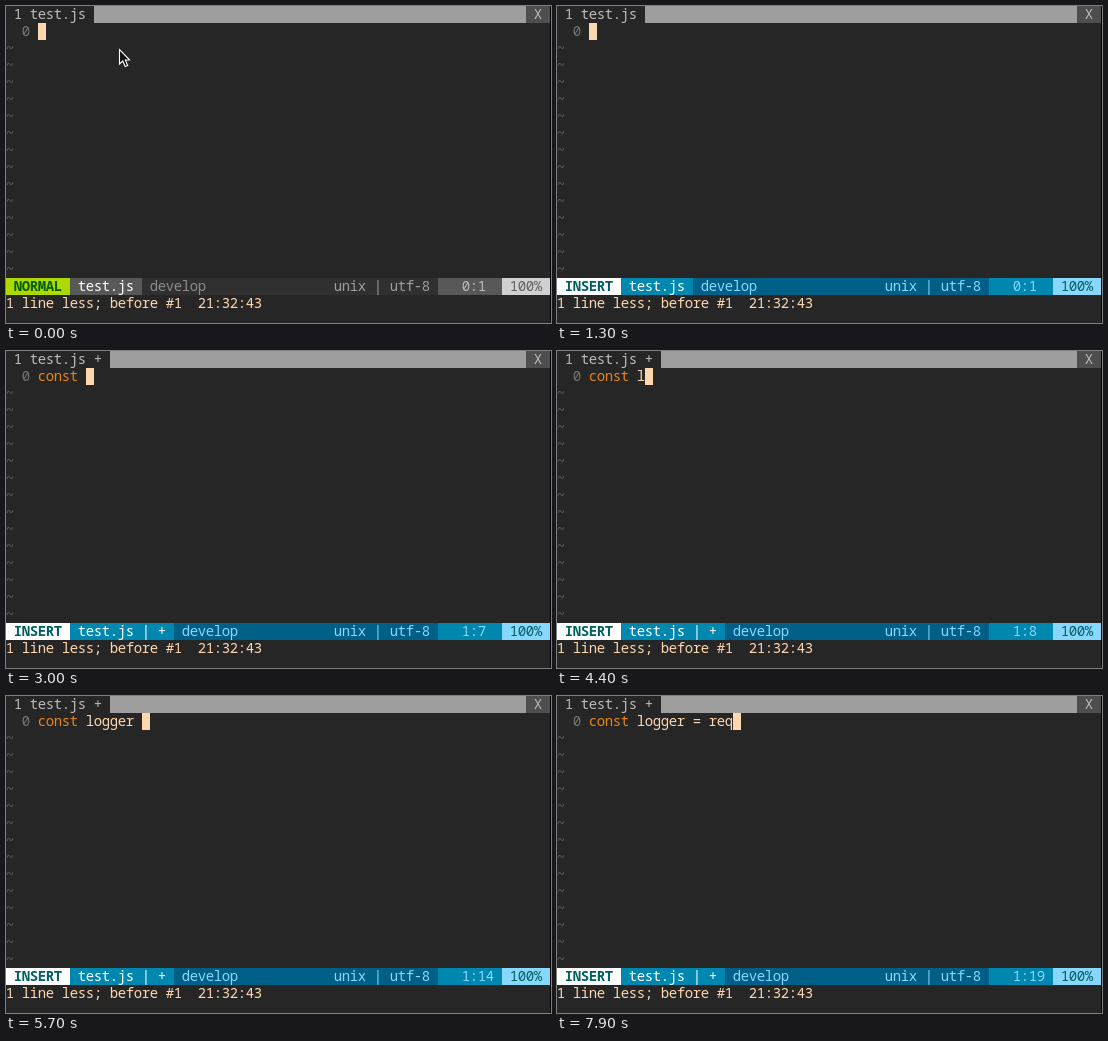
An HTML page with a canvas for the animation above (8 s loop, 545x317 px).

```html
<!DOCTYPE html>
<html lang="en">
<head>
<meta charset="utf-8">
<title>Terminal editor</title>
<style>
  html, body { margin: 0; width: 100%; height: 100%; overflow: hidden; background: #262626; }
  canvas { display: block; }
</style>
</head>
<body>
<canvas id="stage" width="545" height="317"></canvas>
<script>
const ctx = document.getElementById('stage').getContext('2d');
const LOOP = 8000, CELL = 8, ROW = 17, BASELINE = 13;
const FONT = '14px "Noto Sans Mono", "DejaVu Sans Mono", monospace';
const BG = '#262626', FG = '#ffd7af', KEYWORD = '#e8841a';
const LINE = 'const logger = req';
const INSERT_AT = 1300;

// [time, characters typed]
const TYPED = [[0, 0], [2300, 1], [2500, 2], [2700, 4], [3000, 6], [4400, 7], [4800, 8],
  [5300, 10], [5500, 11], [5700, 13], [6000, 14], [6200, 15], [6400, 16], [6700, 17], [7000, 18]];

// spans in which the blinking cursor is hidden
const HIDDEN = [[200, 700], [1600, 2200], [3900, 4100], [7300, 7900]];

const THEMES = {
  normal: {
    label: ' NORMAL ', mode: ['#005f00', '#afd700'], file: ['#ffffff', '#585858'],
    branch: ['#8a8a8a', '#303030'], format: ['#9e9e9e', '#303030'],
    pos: ['#bcbcbc', '#585858'], percent: ['#606060', '#d0d0d0']
  },
  insert: {
    label: ' INSERT ', mode: ['#005f5f', '#ffffff'], file: ['#ffffff', '#0087af'],
    branch: ['#87d7ff', '#005f87'], format: ['#87d7ff', '#005f87'],
    pos: ['#87d7ff', '#0087af'], percent: ['#005f5f', '#87d7ff']
  }
};

function fill(col, row, count, color) {
  ctx.fillStyle = color;
  ctx.fillRect(col * CELL, row * ROW, count * CELL, ROW);
}

// Writes centred in the cells of the grid and returns the next free column.
function write(col, row, text, [color, back], bold) {
  if (back) fill(col, row, text.length, back);
  ctx.font = (bold ? 'bold ' : '') + FONT;
  ctx.textAlign = 'center';
  ctx.fillStyle = color;
  [...text].forEach((ch, i) => {
    if (ch !== ' ') ctx.fillText(ch, (col + i + 0.5) * CELL, row * ROW + BASELINE);
  });
  return col + text.length;
}

function drawTabs(modified) {
  fill(0, 0, 68, '#9e9e9e');
  write(0, 0, ' 1 test.js ' + (modified ? '+ ' : ''), ['#bcbcbc', BG]);
  write(65, 0, ' X ', ['#bcbcbc', '#4e4e4e']);
}

function drawBuffer(count, cursorOn) {
  write(2, 1, '0', ['#767676']);
  const text = LINE.slice(0, count);
  write(4, 1, text, [FG]);
  if (count > 5) write(4, 1, 'const', [KEYWORD, BG]);
  if (cursorOn) fill(4 + count, 1, 1, FG);
  for (let row = 2; row < 16; row++) write(0, row, '~', ['#5c5c5c']);
}

function drawStatus(theme, count) {
  const row = 16;
  fill(0, row, 68, theme.branch[1]);
  let col = write(0, row, theme.label, theme.mode, true);
  col = write(col, row, ' test.js ' + (count ? '| + ' : ''), theme.file);
  write(col, row, ' develop', theme.branch);
  write(41, row, 'unix | utf-8', theme.format);
  const place = (count ? 1 : 0) + ':' + String(count + 1).padEnd(2);
  write(54, row, '   ' + place + ' ', theme.pos);
  write(62, row, ' 100% ', theme.percent);
  write(0, 17, '1 line less; before #1  21:32:43', [FG]);
}

function drawPointer(x, y) {
  const points = [[0, 0], [0, 14.5], [3.3, 11.5], [5.7, 17], [8.2, 16], [5.8, 10.6], [10, 10.3]];
  ctx.beginPath();
  points.forEach(([dx, dy]) => ctx.lineTo(x + dx, y + dy));
  ctx.closePath();
  ctx.fillStyle = '#101010';
  ctx.fill();
  ctx.strokeStyle = '#ffffff';
  ctx.lineWidth = 1.1;
  ctx.stroke();
}

function draw(t) {
  const count = TYPED.filter(([at]) => t >= at).pop()[1];
  const cursorOn = !HIDDEN.some(([from, to]) => t >= from && t < to);
  const inserting = t >= INSERT_AT;
  ctx.fillStyle = BG;
  ctx.fillRect(0, 0, 545, 317);
  drawTabs(count > 0);
  drawBuffer(count, cursorOn);
  drawStatus(inserting ? THEMES.insert : THEMES.normal, count);
  if (!inserting) drawPointer(113.5, 43.5);
  // window edge
  ctx.fillStyle = '#000000';
  ctx.fillRect(544, 0, 1, 317);
}

const start = performance.now();
function tick() {
  draw((performance.now() - start) % LOOP);
  requestAnimationFrame(tick);
}
draw(0);
requestAnimationFrame(tick);
</script>
</body>
</html>
```
